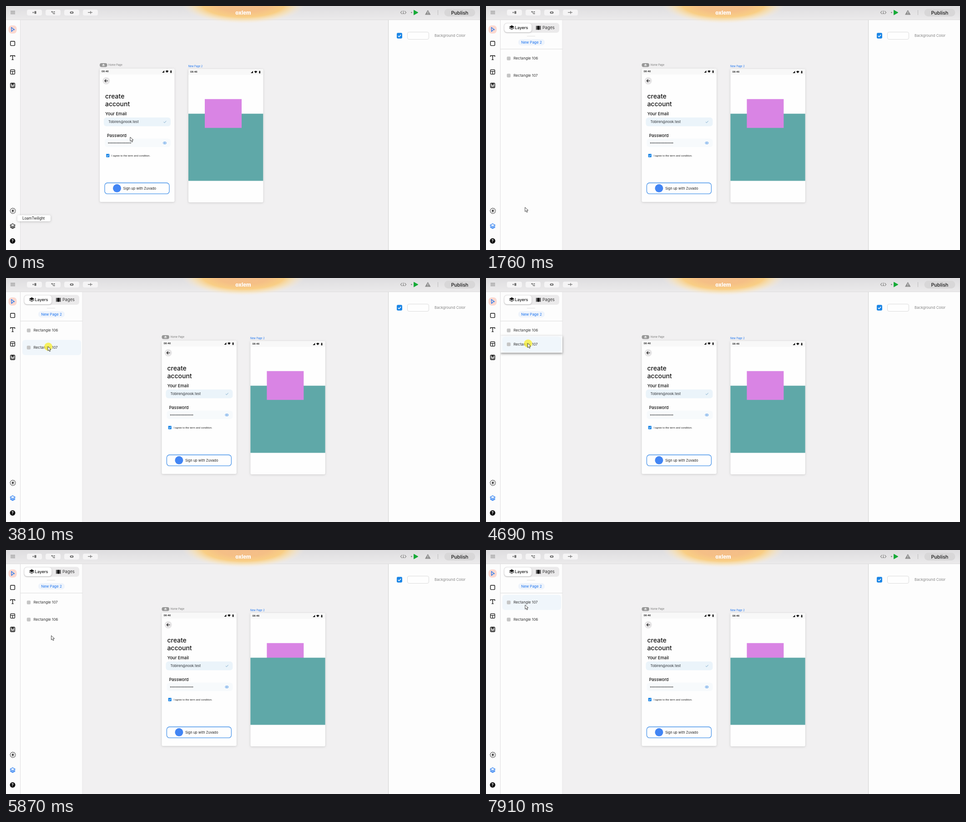
Write an HTML page with a canvas that moves like this. It is 1042x538 px and loops after 8000 ms.

```html
<!DOCTYPE html>
<html lang="en">
<head>
<meta charset="utf-8">
<title>Layer reordering</title>
<style>
html, body { margin: 0; width: 100%; height: 100%; overflow: hidden; background: #f1f0f1; }
canvas { display: block; }
</style>
</head>
<body>
<canvas id="stage" width="1042" height="538"></canvas>
<script>
const ctx = document.getElementById('stage').getContext('2d');
const LOOP = 8000;
const BLUE = '#1a73f0', CHECK_BLUE = '#1c86e6', INK = '#161616';
const ROW_TOP = 115.5, ROW_BOTTOM = 153.2;
const PANEL_OPEN = 1690, PRESS = 3740, DRAG = 4340, DROP = 5610, REORDER = 5820;

// Pointer path: time, x, y
const PATH = [
  [70, 273, 289], [400, 62, 476], [560, 11, 508], [750, 13, 475], [890, 13, 475],
  [1090, 13, 486], [1690, 13, 486], [1970, 300, 320], [2250, 548, 126], [2320, 546, 130],
  [2560, 430, 155], [2800, 233, 173], [3070, 92, 183], [3130, 92, 183], [3740, 92, 151],
  [DRAG, 92, 151], [4690, 91.5, 144], [5120, 93, 121], [5260, 93, 114], [5470, 94, 111],
  [DROP, 94, 111], [6080, 104, 251], [6280, 104, 251], [6760, 76, 151], [7030, 85, 127],
  [7230, 85, 127], [7910, 86, 121]
];

const clamp01 = v => Math.max(0, Math.min(1, v));
const progress = (t, a, b) => clamp01((t - a) / (b - a));
const mix = (a, b, k) => a + (b - a) * k;

function pointerAt(t) {
  const next = PATH.findIndex(p => p[0] > t);
  if (next === 0) return { x: PATH[0][1], y: PATH[0][2] };
  const a = PATH[(next < 0 ? PATH.length : next) - 1];
  const b = next < 0 ? a : PATH[next];
  const k = a === b ? 0 : progress(t, a[0], b[0]);
  return { x: mix(a[1], b[1], k), y: mix(a[2], b[2], k) };
}

function rect(x, y, w, h, fill, r = 0, stroke, lw = 1) {
  ctx.beginPath();
  ctx.roundRect(x, y, w, h, r);
  if (fill) { ctx.fillStyle = fill; ctx.fill(); }
  if (stroke) { ctx.strokeStyle = stroke; ctx.lineWidth = lw; ctx.stroke(); }
}

function disc(x, y, r, fill) {
  ctx.beginPath();
  ctx.arc(x, y, r, 0, Math.PI * 2);
  ctx.fillStyle = fill;
  ctx.fill();
}

function poly(points, fill, stroke, lw = 1, closed = true) {
  ctx.beginPath();
  for (let i = 0; i < points.length; i += 2) ctx.lineTo(points[i], points[i + 1]);
  if (closed) ctx.closePath();
  if (fill) { ctx.fillStyle = fill; ctx.fill(); }
  if (stroke) {
    ctx.strokeStyle = stroke;
    ctx.lineWidth = lw;
    ctx.lineJoin = 'round';
    ctx.stroke();
  }
}

const line = (points, color, lw = 1) => poly(points, null, color, lw, false);

// y is the middle of the capital letters
function label(str, x, y, size, color = INK, weight = 400, align = 'left', font = 'Inter') {
  ctx.font = `${weight} ${size}px "${font}", sans-serif`;
  ctx.textAlign = align;
  ctx.fillStyle = color;
  ctx.fillText(str, x, y + size * 0.36);
}

function shadowed(color, blur, dy, draw) {
  ctx.save();
  ctx.shadowColor = color;
  ctx.shadowBlur = blur;
  ctx.shadowOffsetY = dy;
  draw();
  ctx.restore();
}

function at(x, y, draw) {
  ctx.save();
  ctx.translate(x, y);
  draw();
  ctx.restore();
}

function tick(x, y, s, color, lw) {
  line([x - s, y, x - s * 0.3, y + s * 0.7, x + s, y - s * 0.75], color, lw);
}

function layersIcon(x, y, color, solid, s = 1) {
  at(x, y, () => {
    ctx.scale(s, s);
    poly([0, -5.8, 6, -2.3, 0, 1.2, -6, -2.3], solid && color, color, solid ? 0.5 : 1.3);
    line([-6, 0.6, 0, 4, 6, 0.6], color, 1.3);
    if (!solid) line([-6, 2.6, 0, 6, 6, 2.6], color, 1.3);
  });
}

function statusBar(x, y) {
  rect(x, y, 164.5, 13, '#f8f8f8', [3, 3, 0, 0]);
  label('08:46', x + 4, y + 6.5, 5.4, INK, 600);
  poly([x + 137, y + 9, x + 142, y + 9, x + 142, y + 4], INK);
  ctx.beginPath();
  ctx.moveTo(x + 148, y + 9.3);
  ctx.arc(x + 148, y + 9.3, 5, -2.3, -0.84);
  ctx.fillStyle = INK;
  ctx.fill();
  rect(x + 155.3, y + 4.4, 2.8, 5.2, INK, 0.6);
  rect(x + 156, y + 3.7, 1.4, 1, INK);
}

function pageCard(x, y) {
  shadowed('rgba(0,0,0,.16)', 4, 1, () => rect(x, y, 164.5, 294, '#fefefe', 3));
  statusBar(x, y);
}

function homePage() {
  rect(206, 126, 16.5, 8.5, '#989898', 4);
  poly([214.2, 127.6, 217, 130, 216.2, 130, 216.2, 132.6, 212.2, 132.6, 212.2, 130, 211.4, 130], '#eee');
  rect(213.6, 130.6, 1.2, 2, '#989898');
  label('Home Page', 225, 130.3, 5.6, '#777');
  pageCard(206, 138);

  disc(220.3, 165, 8, '#e7e6e7');
  line([224, 165, 217, 165], INK, 1.1);
  line([220, 162, 217, 165, 220, 168], INK, 1.1);
  label('create', 218, 199.4, 14, '#111', 500);
  label('account', 218, 216.2, 14, '#111', 500);

  label('Your Email', 218.3, 237.8, 9.4, '#111', 500);
  rect(215, 245.7, 147, 19.6, '#ebf4fa', 6);
  label('Tobiren@nook.test', 225, 255.3, 7.5, '#2a2e33');
  tick(349.3, 255.6, 2.8, '#6d9fc4', 0.9);

  label('Password', 222, 285.3, 9.2, '#111', 500);
  rect(217, 292.5, 145, 18.5, '#f7fafc', 6);
  for (let i = 0; i < 16; i++) disc(225.4 + i * 3.23, 302, 1.05, '#222');
  ctx.beginPath();
  ctx.ellipse(349, 302, 3.6, 2.4, 0, 0, Math.PI * 2);
  ctx.strokeStyle = '#5a9de8';
  ctx.lineWidth = 1;
  ctx.stroke();
  disc(349, 302, 1.3, '#5a9de8');

  rect(220.2, 326, 7.2, 7.4, CHECK_BLUE, 1);
  tick(223.8, 329.8, 2.2, '#fff', 1);
  label('I agree to the term and condition.', 232, 329.9, 5.8, '#222', 400, 'left', 'Liberation Sans');

  rect(217, 390, 142, 24.2, '#fefefe', 6, '#4a95ea', 1.3);
  disc(244, 401.8, 9, '#4285f4');
  label('Sign up with Zuvado', 257.5, 401.8, 7.5, '#222');
}

function secondPage(reordered) {
  label('New Page 2', 400.7, 133.3, 5.5, BLUE);
  pageCard(401, 139);
  const shapes = [
    () => rect(401, 237.4, 164.3, 148.2, '#5fa8a8'),
    () => rect(437, 205.3, 81, 63.5, '#d984e4')
  ];
  if (reordered) shapes.reverse();
  shapes.forEach(draw => draw());
}

function toolbar() {
  const bar = ctx.createLinearGradient(0, 0, 0, 30);
  bar.addColorStop(0, '#dedddf');
  bar.addColorStop(1, '#ebeaeb');
  rect(0, 0, 1042, 30, bar);
  rect(0, 30, 1042, 1, '#dddcdd');

  at(522, -4, () => {
    ctx.scale(136, 43);
    const glow = ctx.createRadialGradient(0, 0, 0, 0, 0, 1);
    glow.addColorStop(0, '#f3bd8c');
    glow.addColorStop(0.42, '#f5bf86');
    glow.addColorStop(0.66, 'rgba(250,205,128,.95)');
    glow.addColorStop(0.82, 'rgba(252,224,170,.6)');
    glow.addColorStop(1, 'rgba(250,236,220,0)');
    disc(0, 0, 1, glow);
  });
  label('oxlem', 521.5, 14.6, 11.5, '#fff', 800, 'center');

  for (const y of [11.5, 14.3, 17.1]) line([10, y, 20, y], '#777', 1);
  for (let i = 0; i < 4; i++) rect(46 + i * 41, 8, 33, 13, '#f5f4f5', 4);
  const gray = '#6f6f6f';
  rect(62.5, 11.3, 4, 6, gray, 0.8);
  line([58, 14.3, 61.5, 14.3], gray);
  line([59.8, 12.6, 59.8, 16], gray);
  rect(99.6, 11.6, 3, 2.4, gray);
  rect(104.5, 12, 3, 2, gray);
  rect(104.5, 15.8, 3, 2, gray);
  line([101, 13, 103, 13, 103, 16.8, 105, 16.8], gray, 0.9);
  ctx.beginPath();
  ctx.ellipse(144.5, 14.4, 4, 2.7, 0, 0, Math.PI * 2);
  ctx.fillStyle = gray;
  ctx.fill();
  disc(144.5, 14.4, 1.3, '#f5f4f5');
  line([180, 14.3, 190, 14.3], gray, 1.2);
  line([186, 11, 186, 17.6], gray, 1.2);

  line([870.8, 10.8, 867.3, 14.3, 870.8, 17.8], '#858585', 1.2);
  line([876.2, 10.8, 879.7, 14.3, 876.2, 17.8], '#858585', 1.2);
  line([873.5, 10, 873.5, 17.5], '#858585', 1.1);
  line([871.8, 15.8, 873.5, 17.8, 875.2, 15.8], '#858585', 1);
  disc(891.5, 14.3, 1.4, '#8b8b8b');
  poly([896.5, 9, 906, 14.4, 896.5, 19.8], '#14aa36', '#14aa36', 0.8);
  poly([927.3, 9.3, 933, 19, 921.6, 19], '#8f8f8f', '#8f8f8f', 0.8);
  rect(926.8, 12.5, 1.1, 3.2, '#eee');
  rect(926.8, 16.6, 1.1, 1.1, '#eee');
  rect(949, 9, 1, 11, '#bbb');
  rect(963.5, 6, 68, 17, '#d8d7d8', 8.5);
  label('Publish', 997.3, 14.7, 10.8, '#171717', 500, 'center');
}

function sidebar(layersActive) {
  rect(0, 31, 31, 507, '#fcfcfc');
  rect(31, 31, 1, 507, '#dfdedf');
  rect(5.5, 42.7, 18, 18, '#fbd8d0', 7);
  poly([11.8, 47.2, 18.6, 52.2, 15, 53, 12.2, 56.3], null, BLUE, 1.2);
  rect(9.8, 77.8, 9.6, 9.6, null, 1.6, INK, 1.4);
  line([9.7, 112, 9.7, 109.5, 19.5, 109.5, 19.5, 112], INK, 1.3);
  line([14.6, 109.5, 14.6, 118.5], INK, 1.4);
  line([12.4, 118.5, 16.8, 118.5], INK, 1.2);
  rect(9.8, 140.3, 9.6, 10, null, 1.6, INK, 1.3);
  line([9.8, 144, 19.4, 144], INK, 1.2);
  line([14.6, 144, 14.6, 150.3], INK, 1.2);
  rect(9.8, 170, 9.6, 10.2, null, 2, INK, 1.5);
  rect(12, 170.8, 5.2, 3, INK);
  rect(12, 176, 5.2, 3, null, 0, INK, 1);

  for (let i = 0; i < 12; i++) {
    at(15, 451.6, () => {
      ctx.rotate(i * Math.PI / 6);
      line([0, -4.6, 0, -6.8], INK, 1.2);
    });
  }
  poly([16.2, 447.4, 11.8, 452.4, 14.6, 452.4, 13.8, 455.8, 18.2, 450.8, 15.4, 450.8], INK);

  layersIcon(14.6, 485.3, layersActive ? BLUE : INK, false, 0.92);
  disc(14.5, 518, 6, '#0d0d0d');
  label('?', 14.5, 518.1, 8.5, '#fff', 700, 'center');
}

function propertyPanel() {
  rect(841, 31, 201, 507, '#fdfdfd');
  rect(840, 31, 1.2, 507, '#d6d5d6');
  rect(859, 59.3, 12, 12.4, CHECK_BLUE, 2.4);
  tick(865, 65.8, 3.2, '#fff', 1.5);
  rect(882.5, 57.5, 47, 16, '#fefefe', 3.5, '#dcdcdc');
  label('Background Color', 942, 65.5, 8, '#858585');
}

function layerRow(name, y, hovered) {
  if (hovered) rect(36, y - 16.7, 129, 33.4, '#f0f6fb', 6);
  rect(45.8, y - 4, 8.2, 8.2, '#c5c5c5', 2);
  label(name, 60.5, y, 8.1, '#333');
}

function layersPanel(t, pointer) {
  rect(32, 31, 136, 507, '#fdfdfd');
  rect(167.5, 31, 1, 507, '#e8e7e8');
  rect(39.5, 37.3, 121.5, 21.8, '#ebeaeb', 6);
  shadowed('rgba(0,0,0,.25)', 3, 1, () => rect(40.3, 38.2, 60, 19.8, '#fff', 6));
  layersIcon(56.6, 48, INK, true, 0.9);
  label('Layers', 63.5, 48, 9.1, INK, 500);
  rect(112.2, 43.8, 6, 8.6, INK, 0.8);
  rect(110, 43.8, 1.3, 8.6, INK);
  rect(119, 43.8, 1.3, 8.6, INK);
  label('Pages', 124, 48, 9.2, '#333');
  rect(90, 66, 18, 1, '#dedede');
  rect(70.8, 73, 58.4, 14, '#eff4fb', 7);
  label('New Page 2', 100, 80.2, 8, BLUE, 400, 'center');
  rect(32, 94.6, 136, 1, '#dcdcdc');

  const dragging = t >= DRAG && t < REORDER;
  const movingY = t < DRAG ? ROW_BOTTOM
    : Math.max(ROW_TOP, ROW_BOTTOM + Math.min(0, pointerAt(Math.min(t, DROP)).y - 151));
  const otherY = mix(ROW_TOP, ROW_BOTTOM, progress(t, 5020, 5230));
  const over = y => !dragging && pointer.x > 36 && pointer.x < 165 && Math.abs(pointer.y - y) < 17;

  layerRow('Rectangle 106', otherY, over(otherY));
  if (dragging) {
    const lift = 1 - progress(t, DROP, REORDER);
    shadowed(`rgba(0,0,0,${0.42 * lift})`, 5, 2, () => rect(32, movingY - 18.8, 136, 37.4, '#f8fafc'));
  }
  layerRow('Rectangle 107', movingY, dragging || over(movingY));
}

function tooltip(str, y, width, alpha) {
  if (alpha <= 0) return;
  ctx.globalAlpha = alpha;
  shadowed('rgba(0,0,0,.22)', 5, 1, () => rect(25, y, width, 13.4, '#fff', 3));
  label(str, 36, y + 6.8, 8.2, '#222', 400, 'left', 'Roboto');
  ctx.globalAlpha = 1;
}

function drawPointer({ x, y }, pressed) {
  if (pressed) disc(x + 1, y + 0.5, 9, 'rgba(247,238,62,.82)');
  at(x, y, () => poly([0, 0, 0, 9.4, 2.2, 7.4, 3.8, 11, 5.5, 10.2, 4, 6.8, 7, 6.6], '#fff', '#333', 0.9));
}

function render(t) {
  const pointer = pointerAt(t);
  const open = t >= PANEL_OPEN;
  rect(0, 0, 1042, 538, '#f1f0f1');
  at(open ? 136.4 : 0, 0, () => {
    homePage();
    secondPage(t >= REORDER);
  });
  propertyPanel();
  if (open) layersPanel(t, pointer);
  sidebar(t >= 890);
  toolbar();
  tooltip('LoamTwilight', 461.3, 73, 1 - progress(t, 70, 220));
  if (t < 1490) tooltip('Layers and Pages', 495, 94, progress(t, 890, 1090));
  drawPointer(pointer, (t >= 1490 && t < 1560) || (t >= PRESS && t < DROP));
}

const start = performance.now();
function frame() {
  render((performance.now() - start) % LOOP);
  requestAnimationFrame(frame);
}
frame();
</script>
</body>
</html>
```
